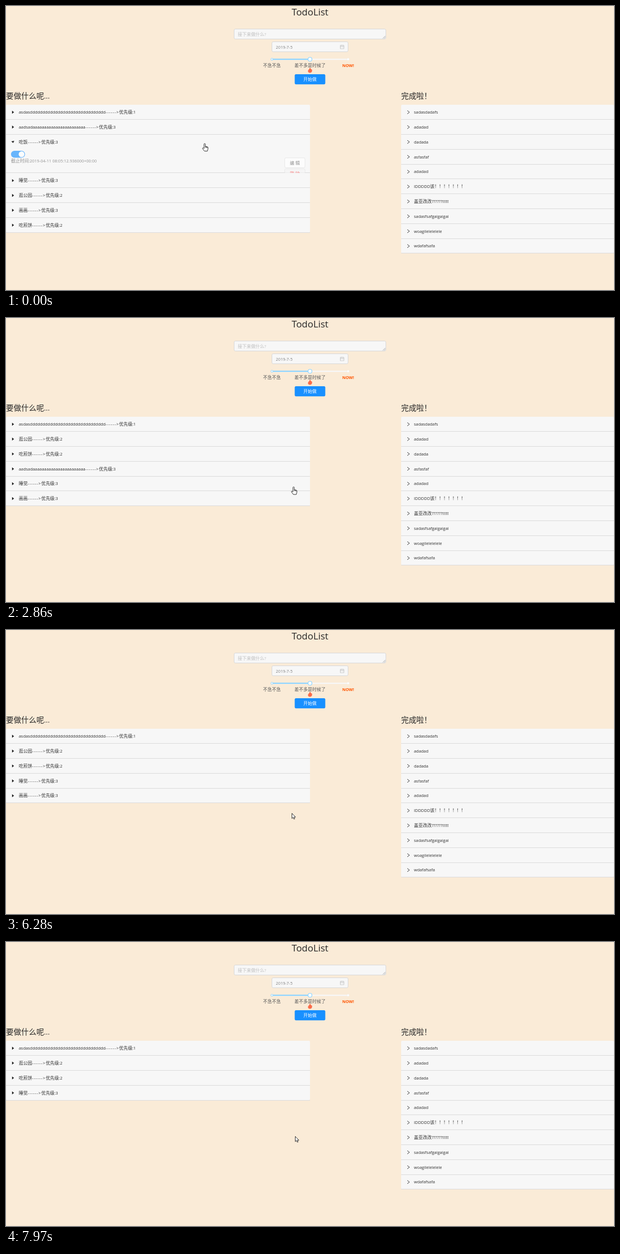
Recreate the animation shown at these times as an HTML page. Size 1094 by 512 pixels, loop 8000 ms.

```html
<!DOCTYPE html>
<html lang="zh-CN">
<head>
<meta charset="utf-8">
<title>TodoList</title>
<style>
html, body { margin: 0; width: 100%; height: 100%; overflow: hidden; background: #faebd7; }
svg { display: block; }
text { font: 7.98px "Open Sans", "Noto Sans CJK SC", "Noto Sans CJK", sans-serif; fill: #595959; }
.latin { font-size: .93em; }
.dashes { letter-spacing: .85px; }
.title { font-size: 18.2px; font-weight: 500; fill: #262626; }
.heading { font-size: 13.68px; fill: #262626; }
.item { fill: #303030; }
.hint { fill: #bfbfbf; }
.date { fill: #808080; }
.urgent { fill: #f50; font-weight: 700; }
.white { fill: #fff; }
.strong { fill: #fff; font-weight: 500; }
.blue { fill: #40a9ff; }
.red { fill: #ff4d4f; }
.mid { text-anchor: middle; }
.field { fill: #f7f7f7; stroke: #d9d9d9; }
.icon { fill: none; stroke: #bfbfbf; stroke-width: .8; }
.cursor { fill: #fff; stroke: #222; stroke-width: .9; stroke-linejoin: round; }
</style>
</head>
<body>
<svg width="1094" height="512" viewBox="0 0 1094 512">
  <g id="labels"></g>
  <g id="form">
    <rect class="field" x="410.5" y="41.5" width="273" height="18" rx="2.3"/>
    <path d="M678 58.5l4.5-4.5M680.5 58.5l2-2" stroke="#888" stroke-width=".7"/>
    <rect class="field" x="478.5" y="64.5" width="137" height="18" rx="2.3"/>
    <path class="icon" d="M601.5 71h6.5v6h-6.5zM601.5 73.3h6.5M603.3 70v1.8M606.2 70v1.8"/>
    <rect x="477" y="94.9" width="141" height="2.3" rx="1.1" fill="#f7f7f7"/>
    <rect x="478.5" y="94.9" width="68.5" height="2.3" fill="#91d5ff"/>
    <circle cx="478.5" cy="96" r="1.8" fill="#fff" stroke="#91d5ff"/>
    <circle cx="615.5" cy="96" r="1.9" fill="#fff" stroke="#f0f0f0" stroke-width=".7"/>
    <circle cx="547" cy="96" r="3.5" fill="#fff" stroke="#91d5ff" stroke-width="1.2"/>
    <path d="M546.5 111.2c2 1 2.3 2.3 2.6 3.3l.9-.7c1.8 3.4.3 6.6-3 6.6-3.600 0-4.600-3.300-2.600-5.500 1.300-1.300 2-2 2.100-3.700z" fill="#fb6b48"/>
    <rect x="519.5" y="123" width="55" height="18.300" rx="2.300" fill="#1890ff"/>
  </g>
  <g id="captions"></g>
  <g id="done"></g>
  <g id="todo"></g>
</svg>
<script>
const LOOP = 8000, TOP = 177.8, ROW = 26.81, CONTENT = 53.4, WIDTH = 547;
const $ = id => document.getElementById(id);

// Latin runs are set slightly smaller than the Chinese around them.
const rich = s => s.replace(/-{3,}>|[ -~]+?(?=---|[^ -~]|$)/g, run =>
  `<tspan class="latin ${run.startsWith('---') ? 'dashes' : ''}">${run.replace('>', '&gt;')}</tspan>`);
const text = (s, x, y, cls = '') => `<text x="${x}" y="${y}" class="${cls}">${rich(s)}</text>`;
const rect = (x, y, w, h, fill, extra = '') =>
  `<rect x="${x}" y="${y}" width="${w}" height="${h}" fill="${fill}" ${extra}/>`;

$('labels').innerHTML =
  text('TodoList', 547, 17, 'title mid') +
  text('要做什么呢...', 0, 166.8, 'heading') +
  text('完成啦！', 711, 166.8, 'heading');
$('captions').innerHTML =
  text('接下来做什么?', 417, 53.8, 'hint') +
  text('2019-7-5', 485.5, 76.7, 'date') +
  text('不急不急', 478.5, 109.5, 'mid') +
  text('差不多是时候了', 547, 109.5, 'mid') +
  text('NOW!', 615.5, 109.5, 'mid urgent') +
  text('开始做', 547, 135.2, 'mid strong');

const done = ['sadasdadafs', 'adadad', 'dadada', 'asfasfaf', 'adadad', 'IDDDDD该！！！！！！！',
  '盖亚改改??????!!!!!!', 'sadasfsafgaigaigai', 'woagilelelelele', 'wdafafsafa'];
$('done').innerHTML = rect(711, 178, 383, 267.5, '#f7f7f7', 'rx="2"') + done.map((name, i) => {
  const y = TOP + i * ROW;
  return rect(711, Math.floor(y + ROW), 383, 1, '#dcdcdc') +
    `<path d="M722 ${y + 10.7}l4 3-4 3" fill="none" stroke="#333" stroke-width=".9"/>` +
    text(name, 734, y + 16.4, 'item');
}).join('');

const tasks = {
  long: ['asdas' + 'd'.repeat(30), 1, '04-11 07:58:20.118000'],
  wide: ['aadsad' + 'a'.repeat(23), 3, '04-20 07:34:16.626000'],
  eat: ['吃饭', 3, '04-11 08:05:12.936000'],
  sleep: ['睡觉', 3, '04-11 08:05:31.402000'],
  park: ['逛公园', 2, '04-11 08:06:48.257000'],
  draw: ['画画', 3, '04-11 08:07:21.774000'],
  cake: ['吃煎饼', 2, '04-11 08:08:03.519000']
};
// Each list stays until the next one starts.
const lists = [
  [0, 'long wide eat sleep park draw cake'],
  [2580, 'long park cake wide sleep draw'],
  [5290, 'long park cake sleep draw'],
  [7970, 'long park cake sleep']
];
// How far the panel in each slot is open: [time, amount].
const opening = {
  2: [[0, .8], [120, 1], [2580, 1], [2860, 0]],
  3: [[4090, 0], [4330, .8], [4480, 1], [5290, 1], [5600, 0]],
  4: [[6563, 0], [6850, 1]]
};
const pointer = [
  [0, 357.5, 248], [250, 357.5, 248], [1050, 517, 302.5], [2320, 517, 303], [2860, 517.5, 304.5],
  [3390, 517.5, 304.5], [3810, 494.5, 278.5], [4090, 494, 281], [4330, 492.5, 288], [4480, 500, 300],
  [5020, 515, 330], [5600, 514.5, 330.5], [6280, 514.5, 330.5], [6563, 515, 298], [6850, 516, 312],
  [7280, 520, 338], [7690, 522.5, 351.5], [7969, 522.5, 351.5], [7970, 520.5, 350.5]
];
const bursts = [[120, 1050, 8], [2320, 2320, 1], [2440, 2860, 4], [3390, 3810, 4], [4090, 4330, 3],
  [4480, 5020, 5], [5140, 5600, 4], [6280, 6280, 1], [6420, 7280, 7], [7430, 7690, 3], [7970, 7970, 1]];

function snap(t) {
  const burst = bursts.findLast(b => b[0] <= t);
  if (!burst) return 0;
  const [first, last, count] = burst;
  if (t >= last) return last;
  const step = (last - first) / (count - 1);
  return first + Math.floor((t - first) / step) * step;
}

function track(points, t) {
  const i = points.findIndex(p => p[0] > t);
  if (i === 0) return points[0].slice(1);
  if (i < 0) return points.at(-1).slice(1);
  const [a, b] = [points[i - 1], points[i]];
  const k = (t - a[0]) / (b[0] - a[0]);
  return a.slice(1).map((v, n) => v + (b[n + 1] - v) * k);
}

function button(label, y, fill, stroke, cls) {
  return rect(501.5, y, 36.5, 17.7, fill, `rx="2.3" stroke="${stroke}" stroke-width=".8"`) +
    text(label, 519.8, y + 11.9, 'mid ' + cls);
}

function details(deadline, y, open, hover) {
  const edit = hover === 'edit' ? ['#fff', '#40a9ff', 'blue'] : ['#fff', '#d9d9d9', ''];
  const remove = hover === 'remove' ? ['#ff4d4f', '#ff4d4f', 'white'] : ['#f5f5f5', '#dedede', 'red'];
  return `<svg y="${y}" width="${WIDTH}" height="${CONTENT * open}"><g opacity="${open * open}">` +
    rect(9, 2.8, 25.2, 12.5, '#1890ff', 'rx="6.25"') +
    '<circle cx="28" cy="9.05" r="5.2" fill="#fff"/>' +
    text(`截止时间:2019-${deadline}+00:00`, 9, 24.2) +
    button('编 辑', 15.5, ...edit) + button('删 除', 35.2, ...remove) + '</g></svg>';
}

function cursor(x, y, hand) {
  const shape = hand
    ? 'M-1.2 9V1.2a1.2 1.2 0 0 1 2.400 0V5l3.500.8q1.500.4 1.300 2l-.4 3-.8 2.800H-.4L-3.700 9.400q-.8-1.400.4-1.700.9 0 2.100 1.300zM1.200 5v2.500M3 5.500v2.200M4.600 6v2'
    : 'M0 0V9.300L2.200 7.300 3.600 10.500 5.100 9.900 3.700 6.800H6.500Z';
  return `<path class="cursor" transform="translate(${x} ${y})" d="${shape}"/>`;
}

function draw(t) {
  const [px, py] = track(pointer, t);
  const keys = lists.findLast(l => l[0] <= t)[1].split(' ');
  let y = TOP, hand = false, rows = '';
  keys.forEach((key, i) => {
    const [name, priority, deadline] = tasks[key];
    const open = opening[i] ? track(opening[i], t)[0] : 0;
    const body = y + ROW, end = body + CONTENT * open;
    const onButton = open > .9 && px > 501 && px < 538;
    const within = (a, b) => py >= body + a && py < body + b;
    const hover = onButton && (within(15, 33.5) ? 'edit' : within(34.8, CONTENT) ? 'remove' : '');
    if (hover || (py >= y && py < body)) hand = true;
    rows += rect(0, Math.floor(end), WIDTH, 1, '#dcdcdc') +
      `<path d="M-1.6-2.7L2 0-1.6 2.7z" fill="#222" transform="translate(12.5 ${y + 13.7}) rotate(${90 * Math.min(1, open * 1.1)})"/>` +
      text(`${name}------>优先级:${priority}`, 23, y + 16.4, 'item');
    if (open) rows += details(deadline, body, open, hover);
    y = end;
  });
  $('todo').innerHTML = rect(0, 178, WIDTH, y - 178, '#f7f7f7', 'rx="2"') + rows + cursor(px, py, hand);
}

const start = performance.now();
let shown = -1;
function tick() {
  const t = snap((performance.now() - start) % LOOP);
  if (t !== shown) draw(shown = t);
  requestAnimationFrame(tick);
}
tick();
</script>
</body>
</html>
```
